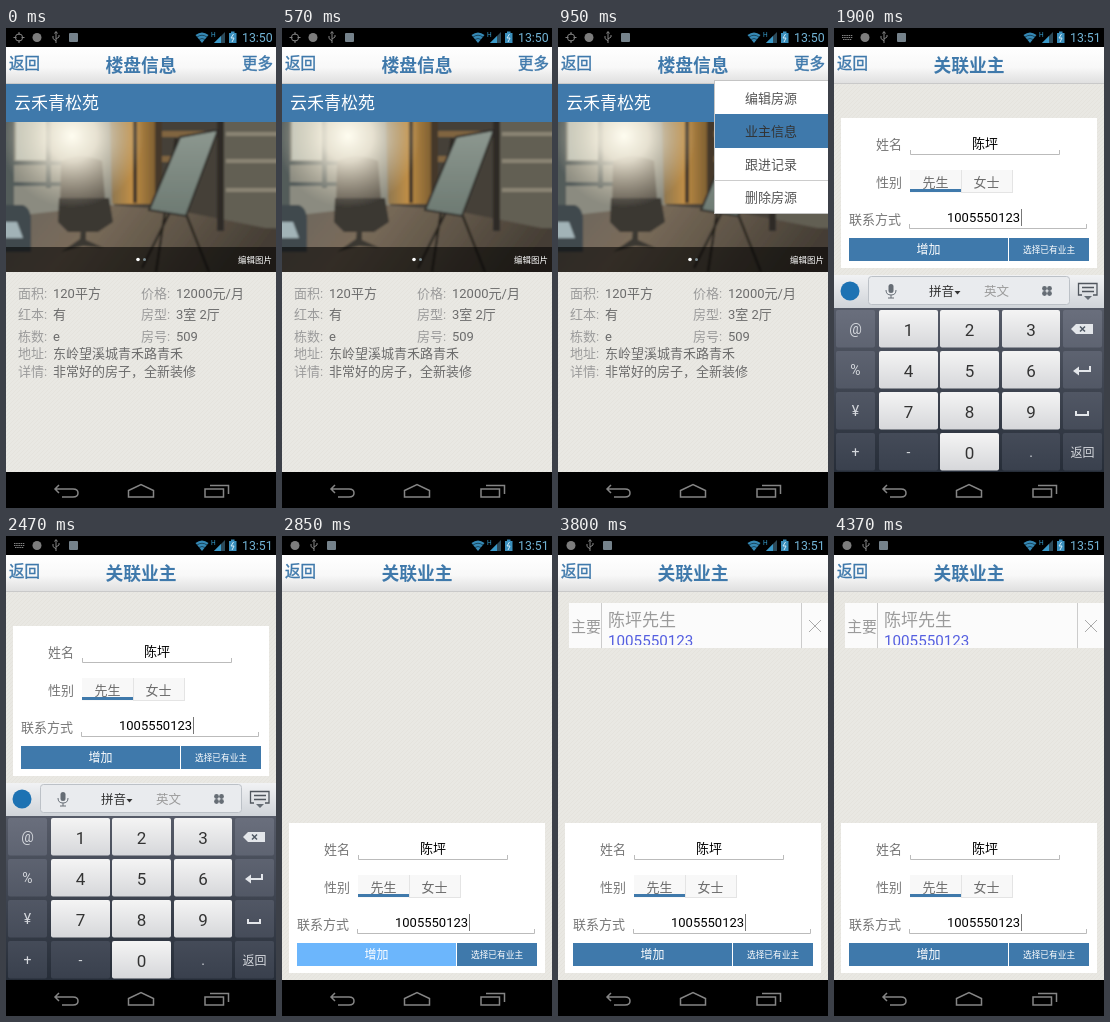
Recreate the animation shown at these times as an HTML page. Size 270 px wide and 480 px high, loop 4750 ms.

```html
<!DOCTYPE html>
<html lang="zh-CN">
<head>
<meta charset="utf-8">
<title>楼盘信息</title>
<style>
html, body { margin: 0; width: 100%; height: 100%; overflow: hidden; background: #000; }
svg { display: block; width: 100%; height: 100%; }
text { font-family: Roboto, "Noto Sans CJK SC", "Noto Sans CJK", sans-serif; font-size: 13px; white-space: pre; }
.mid { text-anchor: middle; }
.blue { fill: #3f79ab; }
.white { fill: #fff; }
.label { fill: #9b9b9b; }
.value { fill: #6c6c6c; }
.nav { font-size: 15.5px; fill: #3f79ab; stroke: #3f79ab; stroke-width: .4; }
.title { font-size: 17.8px; font-weight: 700; fill: #3f79ab; text-anchor: middle; }
.clock { font-size: 12.3px; fill: #72b4d6; }
.line { fill: none; stroke: #bbb; }

.anim { animation: 4750ms step-end infinite; }
.house { animation-name: house; }
.menu { animation-name: menu; }
.owner { animation-name: owner; }
.keys { animation-name: keys; }
.list { animation-name: list; }
.tray { animation-name: tray; }
.form { animation-name: form; }
.add { animation-name: add; }
@keyframes house { 0% { visibility: visible } 40%, 100% { visibility: hidden } }
@keyframes menu { 0% { visibility: hidden } 20% { visibility: visible } 40%, 100% { visibility: hidden } }
@keyframes owner { 0% { visibility: hidden } 40%, 100% { visibility: visible } }
@keyframes keys { 0% { visibility: hidden } 40% { visibility: visible } 60%, 100% { visibility: hidden } }
@keyframes list { 0% { visibility: hidden } 80%, 100% { visibility: visible } }
@keyframes tray { 0% { transform: none } 60%, 100% { transform: translateX(-18px) } }
@keyframes form { 0% { transform: none } 60%, 100% { transform: translateY(197px) } }
@keyframes add { 0% { fill: #3f79ab } 60% { fill: #6cb6fc } 80%, 100% { fill: #3f79ab } }
</style>
</head>
<body>
<svg viewBox="0 0 270 480" preserveAspectRatio="none">
  <defs>
    <pattern id="weave" width="4" height="4" patternUnits="userSpaceOnUse">
      <rect width="4" height="4" fill="#e9e8e3"/>
      <path d="M-1 1L1 -1M0 4L4 0M3 5L5 3" stroke="#e3e2dc" stroke-width=".8"/>
    </pattern>
    <linearGradient id="bar" x2="0" y2="1">
      <stop stop-color="#fff"/><stop offset=".55" stop-color="#f8f8f8"/><stop offset="1" stop-color="#dedede"/>
    </linearGradient>
    <radialGradient id="glow" gradientUnits="userSpaceOnUse" cx="66" cy="108" r="72">
      <stop stop-color="#fffdf0"/><stop offset=".35" stop-color="#f6f0df" stop-opacity=".85"/>
      <stop offset="1" stop-color="#d8cdb4" stop-opacity="0"/>
    </radialGradient>
    <linearGradient id="wood">
      <stop stop-color="#8a7552"/><stop offset=".45" stop-color="#c08e45"/><stop offset="1" stop-color="#74582f"/>
    </linearGradient>
    <linearGradient id="floor" x2="1" y2=".2">
      <stop stop-color="#68645e"/><stop offset=".35" stop-color="#7a6c5a"/><stop offset="1" stop-color="#443d34"/>
    </linearGradient>
    <linearGradient id="board" x2="0" y2="1">
      <stop stop-color="#8d9890"/><stop offset="1" stop-color="#6d7a72"/>
    </linearGradient>
    <linearGradient id="strip" x2="0" y2="1">
      <stop stop-color="#f1f2f4"/><stop offset="1" stop-color="#d0d4d9"/>
    </linearGradient>
    <linearGradient id="light" x2="0" y2="1">
      <stop stop-color="#f4f4f4"/><stop offset="1" stop-color="#d6d7da"/>
    </linearGradient>
    <linearGradient id="dark" gradientUnits="userSpaceOnUse" x1="0" y1="280" x2="0" y2="444">
      <stop stop-color="#6a6f7d"/><stop offset="1" stop-color="#39404d"/>
    </linearGradient>
    <linearGradient id="gap" x2="0" y2="1">
      <stop stop-color="#565b68"/><stop offset="1" stop-color="#262d38"/>
    </linearGradient>
    <filter id="soft"><feGaussianBlur stdDeviation=".9"/></filter>
    <clipPath id="photo"><rect y="94" width="270" height="150"/></clipPath>
    <clipPath id="card"><rect x="11" y="67" width="259" height="42"/></clipPath>
  </defs>

  <rect width="270" height="480"/>
  <rect y="19" width="270" height="425" fill="url(#weave)"/>
  <rect y="19" width="270" height="37" fill="url(#bar)"/>
  <path d="M0 55.5H270" stroke="#c9c9c9"/>
  <text class="nav" x="3" y="41">返回</text>

  <!-- status bar -->
  <g fill="none" stroke="#858585">
    <g class="anim house"><circle cx="13" cy="9.5" r="3.6"/><path d="M13 4v3M13 12v3M7.500 9.500h3M15.500 9.500h3"/></g>
    <path class="anim keys" d="M8 7.500h11M8 9.500h11M9 11.500h9" stroke-dasharray="1.500 .7"/>
    <g class="anim tray">
      <circle cx="31" cy="9.500" r="4.500" fill="#7d7d7d" stroke="none"/>
      <path d="M50 4v11M50 13l-3-2.500V8M50 11l3-2V7M48.500 5.500L50 3.500l1.500 2"/>
      <rect x="63" y="5" width="9" height="9" rx="1" fill="#75828b" stroke="none"/>
    </g>
  </g>
  <path d="M189.500 7q6.500-5 13 0L196 15z" fill="#3689b5"/>
  <path d="M191 9q5-3.500 10 0M193 11.500q3-2 6 0" fill="none" stroke="#0d2a3a" stroke-width=".7"/>
  <text x="205" y="9" style="font-size:6.500px" fill="#39a0d0">H</text>
  <path d="M219 4V15H208z" fill="#2c4a5a"/>
  <path d="M215 8V15H208z" fill="#3a9aca"/>
  <path d="M223 5h2V3.500h3.500V5h2V15h-7.500z" fill="#3a8fbd"/>
  <path d="M227.500 6l-2.500 4h3l-2 4" fill="none" stroke="#cfe9f6"/>
  <text class="clock anim house" x="236" y="14">13:50</text>
  <text class="clock anim owner" x="236" y="14">13:51</text>

  <!-- listing -->
  <g class="anim house">
    <text class="title" x="135" y="43.500">楼盘信息</text>
    <text class="nav" x="236" y="41">更多</text>
    <rect class="blue" y="56" width="270" height="38"/>
    <text class="white" x="8" y="81" style="font-size:17px">云禾青松苑</text>
    <g clip-path="url(#photo)">
      <g filter="url(#soft)">
        <rect x="-9" y="85" width="288" height="168" fill="#454038"/>
        <path d="M-9 85H108V190H-9z" fill="#8b8b80"/>
        <path d="M10 85H40V132H10z" fill="#bfc3b8"/>
        <path d="M-9 85H8V180H-9zM40 85h5v75h-5zM0 133H55v4H0zM0 154H55v4H0z" fill="#525b5a"/>
        <path d="M104 85H153V176H106z" fill="url(#wood)"/>
        <path d="M127 85h4v90h-4zM149 85h7V190h-7z" fill="#44392a"/>
        <path d="M215 85H279V200H211z" fill="#625e53"/>
        <path d="M156 103H207v6H156zM156 128H197v6H156zM156 158H186v6H156z" fill="#806540"/>
        <path d="M220 104H279v4H220zM220 131H279v4H220zM220 160H279v4H220z" fill="#8a8473"/>
        <path d="M-9 190L105 177 170 182 279 204V253H-9z" fill="url(#floor)"/>
        <path d="M55 133q20-9 41 0l4 50H54z" fill="#605a50"/>
        <path d="M53 170H103l4 24-15 10H62L52 194zM75 200h5v12l18 8-21-2-22 6 19-13z" fill="#3b3833"/>
        <path d="M-9 177H17q8 3 8 15v32H-9z" fill="#3f4a4d"/>
        <path d="M-9 194H11l6 16H-9z" fill="#a2b3b7"/>
        <circle cx="66" cy="108" r="72" fill="url(#glow)"/>
        <path d="M170 110L150 244M180 186L203 244M164 184L136 240" stroke="#25231f" stroke-width="2.200"/>
        <path d="M174 109L212 102 180 188 143 182z" fill="url(#board)" stroke="#302f2a" stroke-width="2"/>
        <path d="M211 85h7V203h-7z" fill="#2f2c26"/>
      </g>
      <rect y="219" width="270" height="25" opacity=".58"/>
    </g>
    <circle class="white" cx="132" cy="231.500" r="1.800"/>
    <circle cx="138.500" cy="231.500" r="1.500" fill="#7b8b90"/>
    <text class="white" x="232" y="235" style="font-size:8.500px">编辑图片</text>
    <g class="label">
      <text x="12" y="270">面积:</text><text x="135" y="270">价格:</text>
      <text x="12" y="291">红本:</text><text x="135" y="291">房型:</text>
      <text x="12" y="312.500">栋数:</text><text x="135" y="312.500">房号:</text>
      <text x="12" y="330">地址:</text><text x="12" y="347.500">详情:</text>
    </g>
    <g class="value">
      <text x="47" y="270">120平方</text><text x="170" y="270">12000元/月</text>
      <text x="47" y="291">有</text><text x="170" y="291">3室 2厅</text>
      <text x="47" y="312.500">e</text><text x="170" y="312.500">509</text>
      <text x="47" y="330">东岭望溪城青禾路青禾</text>
      <text x="47" y="347.500">非常好的房子，全新装修</text>
    </g>
  </g>

  <g class="anim menu">
    <rect x="156.500" y="52.500" width="114" height="133" fill="#fff" stroke="#c4c4c4"/>
    <path d="M157 152.500H270" stroke="#ccc"/>
    <rect class="blue" x="157" y="86" width="113" height="34"/>
    <g class="mid" fill="#555">
      <text x="213" y="74.500">编辑房源</text><text x="213" y="107.500" fill="#333">业主信息</text>
      <text x="213" y="140.500">跟进记录</text><text x="213" y="173.500">删除房源</text>
    </g>
  </g>

  <!-- owner -->
  <g class="anim owner">
    <text class="title" x="135" y="43.500">关联业主</text>
    <g class="anim form">
      <rect class="white" x="7" y="90" width="256" height="150"/>
      <g fill="#777">
        <text x="42" y="121">姓名</text><text x="42" y="159">性别</text><text x="15" y="196">联系方式</text>
      </g>
      <path class="line" d="M76.500 122V126.500H225.500V122M75.500 196V200.500H252.500V196"/>
      <text class="mid" x="151" y="119.500">陈坪</text>
      <rect x="76" y="142" width="103" height="23" fill="#f8f8f8"/>
      <path d="M127.500 142V164M178.500 142V164M127 164.500H179" stroke="#e4e4e4"/>
      <rect class="blue" x="76" y="161" width="51" height="3"/>
      <text class="value mid" x="101.500" y="158.500">先生</text>
      <text class="value mid" x="152.500" y="158.500">女士</text>
      <text x="113" y="194">1005550123</text>
      <path d="M187.500 181V198" stroke="#777"/>
      <rect class="anim add" x="15" y="210" width="159" height="23"/>
      <rect class="blue" x="175" y="210" width="80" height="23"/>
      <text class="white mid" x="94.500" y="226" style="font-size:12px">增加</text>
      <text class="white mid" x="215" y="225" style="font-size:8.700px">选择已有业主</text>
    </g>
  </g>

  <g class="anim list">
    <rect x="11" y="67" width="259" height="45" fill="#fbfbfb"/>
    <path d="M43.500 67V112M243.500 67V112" stroke="#ccc"/>
    <g clip-path="url(#card)">
      <text class="label" x="13" y="95.500" style="font-size:15px">主要</text>
      <text class="label" x="50" y="90" style="font-size:17px">陈坪先生</text>
      <text x="50" y="110" fill="#555fe0" style="font-size:15.200px">1005550123</text>
    </g>
    <path d="M251 84l12 12M263 84l-12 12" stroke="#aaa"/>
  </g>

  <!-- keyboard -->
  <g class="anim keys">
    <rect y="280" width="270" height="164" fill="url(#gap)"/>
    <rect y="247" width="270" height="33" fill="url(#strip)"/>
    <rect x="34.500" y="248.500" width="201" height="28" rx="3" fill="#e9ebee" stroke="#bcc1c7"/>
    <circle cx="16" cy="263" r="9.500" fill="#1d72b3"/>
    <rect x="54.500" y="256" width="5" height="9" rx="2.500" fill="#666d75"/>
    <path d="M52 262q0 5 5 5t5-5M57 267v3M54 270h6" fill="none" stroke="#666d75"/>
    <text x="95" y="268" fill="#333" style="font-size:12.500px">拼音</text>
    <path d="M120.500 263h6l-3 3.500z" fill="#333"/>
    <text class="label" x="150" y="268" style="font-size:12.500px">英文</text>
    <g fill="#666d75">
      <circle cx="210.500" cy="260.500" r="2.400"/><circle cx="215.500" cy="260.500" r="2.400"/>
      <circle cx="210.500" cy="265.500" r="2.400"/><circle cx="215.500" cy="265.500" r="2.400"/>
      <path d="M250 268h8l-4 4z"/>
    </g>
    <path d="M248 267h-3.500V255.500h18.500V267H259M248 259.500h12M248 263.500h12" fill="none" stroke="#50565e" stroke-width="1.300"/>
    <g id="pad"></g>
    <g fill="none" stroke="#e3e6ea" stroke-width="2">
      <path d="M237 301l5-5H259V306H242z" fill="#e3e6ea" stroke="none"/>
      <path d="M246 298.500l5 5M251 298.500l-5 5" stroke="#4f5864" stroke-width="1.500"/>
      <path d="M256 338v5H243"/><path d="M239 343l6-4.500v9z" fill="#e3e6ea" stroke="none"/>
      <path d="M242 383v4H254V383"/>
    </g>
  </g>

  <!-- system keys -->
  <g fill="none" stroke="#858585" stroke-width="1.500">
    <path d="M53 457l-4 4 4 4M49 461H67q5 0 5 4t-5 4H56"/>
    <path d="M122.500 469V462.500L135 456.500l12.500 6V469z"/>
    <path d="M199 461H217.500V469H199zM204 457.500H222.500V466"/>
  </g>
</svg>
<script>
const pad = document.getElementById('pad');
const cols = [[2, 39], [45, 59], [106, 59], [168, 58], [229, 39]];
const rows = [['@', '1', '2', '3', ''], ['%', '4', '5', '6', ''], ['¥', '7', '8', '9', ''], ['+', '-', '0', '.', '返回']];

function add(tag, attrs, text = '') {
  const el = document.createElementNS('http://www.w3.org/2000/svg', tag);
  for (const k in attrs) el.setAttribute(k, attrs[k]);
  el.textContent = text;
  pad.append(el);
}

rows.forEach((row, r) => row.forEach((label, c) => {
  const [x, width] = cols[c], y = 282 + r * 41, digit = /\d/.test(label);
  add('rect', { x, y, width, height: 37.5, rx: 2, fill: `url(#${digit ? 'light' : 'dark'})` });
  add('text', {
    x: x + width / 2, y: y + (digit ? 25.5 : 24), class: 'mid',
    fill: digit ? '#333' : '#d5d8dd',
    style: `font-size:${digit ? 17 : label.length > 1 ? 12 : 14}px`
  }, label);
}));
</script>
</body>
</html>
```
